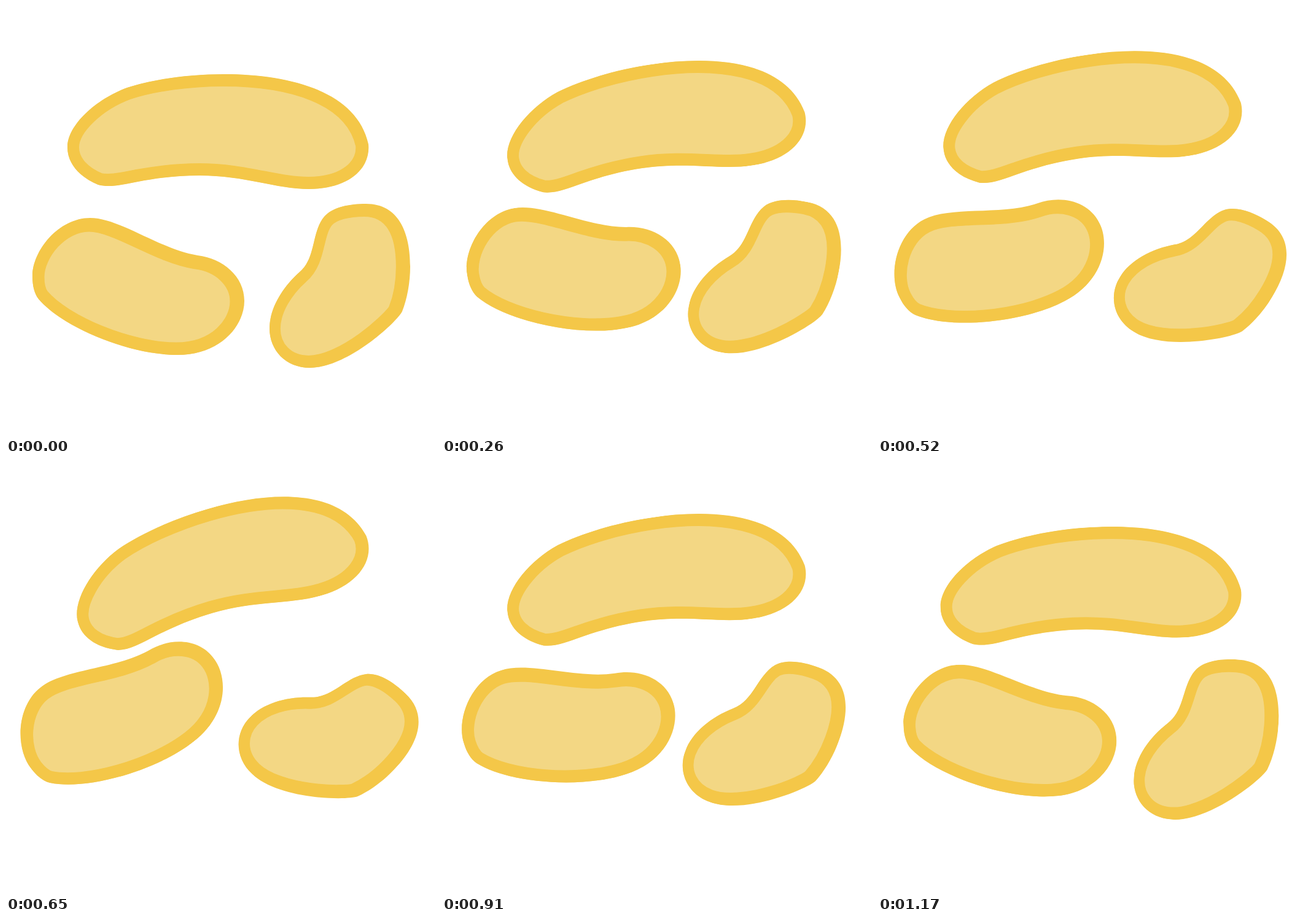
Write an HTML page that moves like this. It is 700x700 px and loops after 1300 ms.

```html
<!DOCTYPE html>
<html lang="en">
<head>
<meta charset="utf-8">
<title>Beans</title>
<style>
  html, body { margin: 0; width: 100%; height: 100%; overflow: hidden; background: #fff; }
  svg { display: block; width: 100%; height: 100%; }
  .bean { fill: #f3d784; stroke: #f4c748; stroke-linejoin: round; }
</style>
</head>
<body>
<svg id="stage" viewBox="0 0 700 700"></svg>
<script>
const STEP = 130;
const LAST = 5;

// Steps elapsed inside a window, and an eased 0..1 swing across it.
const during = (step, from, to) => Math.min(Math.max(step - from, 0), to - from);
const swing = (step, from, to) => (during(step, from, to) / (to - from)) ** 1.5;

// rim: thickness of the border; lean: how far the pale core sits off centre.
const beans = [
  {
    outline: `M100 230C100 194 146 152 197 133C240 119 298 111 355 111
      C460 111 571 138 590 225C594 266 556 298 493 298C440 298 390 276 315 276
      C278 276 247 280 215 286C190 291 168 296 150 291C115 276 100 253 100 230Z`,
    pivot: [345, 205], rim: 20, lean: [-1, 0],
    x: step => 0.1 * step,
    y: step => -7.8 * step,
    turn: step => -8.5 * swing(step, 0, 2) - 7.7 * swing(step, 4, 5)
  },
  {
    outline: `M43 440C43 398 86 345 137 345C185 345 250 396 312 406
      C353 411 388 440 388 480C388 520 350 568 279 568
      C200 568 92 523 53 477C46 468 43 455 43 440Z`,
    pivot: [215, 457], rim: 21.5, lean: [-2, 1],
    x: step => -0.8 * step - 8 * during(step, 2, 5),
    y: step => -7.6 * step - 15.4 * during(step, 0, 1),
    turn: step => -38 * swing(step, 0, 5)
  },
  {
    outline: `M429 525C429 492 450 458 478 433C505 410 497 368 518 343
      C532 327 560 322 586 322C640 322 658 370 658 424C658 450 653 477 645 497
      C637 514 556 589 495 589C455 589 429 560 429 525Z`,
    pivot: [545, 455], rim: 20.5, lean: [-2.7, 0.4],
    x: step => -8 * during(step, 0, 2),
    y: step => -6.6 * during(step, 0, 2),
    turn: step => 43.5 * swing(step, 0, 5)
  }
];

function make(tag, attrs, parent) {
  const node = document.createElementNS("http://www.w3.org/2000/svg", tag);
  for (const key in attrs) node.setAttribute(key, attrs[key]);
  return parent.appendChild(node);
}

// A wide stroke clipped to the outline leaves an inward border.
const stage = document.getElementById("stage");
beans.forEach((bean, i) => {
  const clip = make("clipPath", { id: `clip${i}` }, stage);
  make("path", { d: bean.outline }, clip);
  bean.group = make("g", { "clip-path": `url(#clip${i})` }, stage);
  make("path", {
    class: "bean", d: bean.outline, "stroke-width": 2 * bean.rim,
    transform: `translate(${bean.lean})`
  }, bean.group);
});

function draw(time) {
  const phase = Math.floor(time / STEP) % (2 * LAST);
  const step = LAST - Math.abs(LAST - phase);
  for (const { group, pivot, x, y, turn } of beans) {
    group.setAttribute("transform",
      `translate(${x(step)} ${y(step)}) rotate(${turn(step)} ${pivot})`);
  }
}

const start = performance.now();
function tick() {
  draw(performance.now() - start);
  requestAnimationFrame(tick);
}
tick();
</script>
</body>
</html>
```
